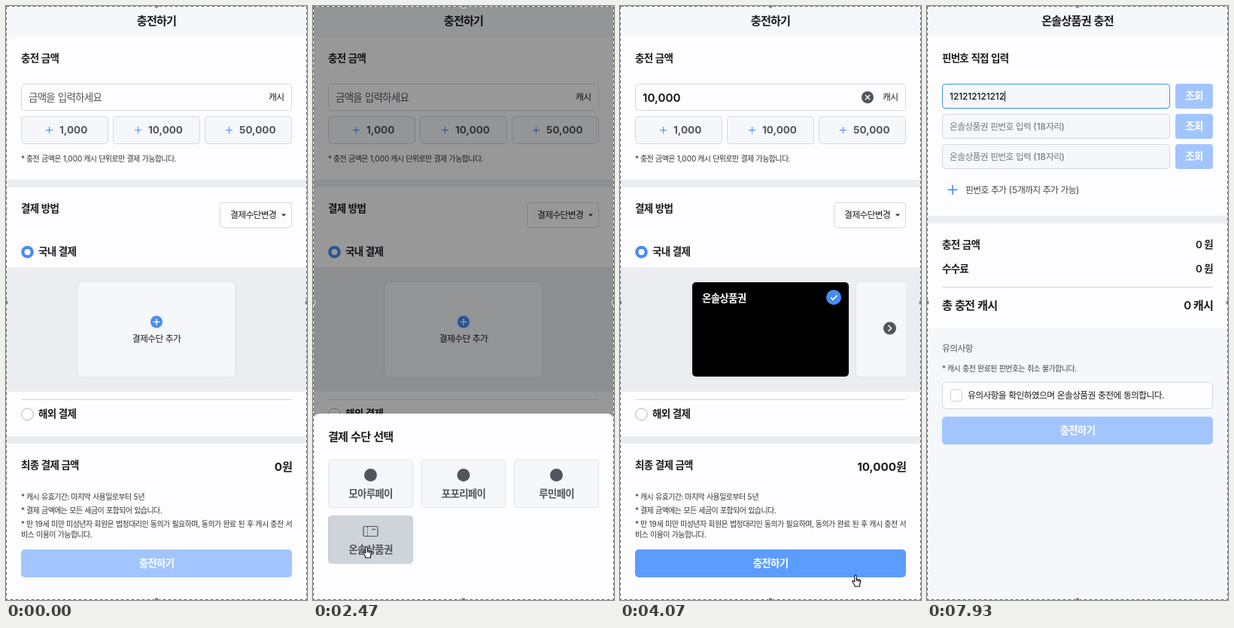
An HTML page with a canvas for the animation above (8 s loop, 400 by 787 pixels).

```html
<!DOCTYPE html>
<html lang="ko">
<head>
<meta charset="utf-8">
<title>충전하기</title>
<style>
html, body { margin: 0; width: 100%; height: 100%; overflow: hidden; background: #fdfcff; }
canvas { display: block; width: 400px; height: 787px; }
</style>
</head>
<body>
<canvas id="stage"></canvas>
<script>
const W = 400, H = 787, LOOP = 8000;
const cv = document.getElementById('stage');
const c = cv.getContext('2d');
const dpr = window.devicePixelRatio || 1;
cv.width = W * dpr;
cv.height = H * dpr;

const FONT = 'Inter, "Noto Sans CJK KR", "Noto Sans CJK JP", sans-serif';
const XS = 9.97, SM = 11.8, MD = 13.5, LG = 15.2;
const WHITE = '#fdfcff', PALE = '#f5f7fb', BAND = '#ecedf0', LINE = '#d6d8dc';
const INK = '#1d1d21', GREY = '#55565c', BLUE = '#458cf7', SOFT = '#a2c5ff', DARK = '#50555e';
const VOUCHER = '온솔상품권';

// moments of the story, in ms
const CHOSEN = 2537, PAID = 3200, NEXT_PAGE = 4270, TYPING = 6270;

// ---------- helpers ----------
const clamp = v => Math.max(0, Math.min(1, v));
const ramp = (t, a, b) => clamp((t - a) / (b - a));
const smooth = p => p * p * (3 - 2 * p);
const easeOut = p => 1 - Math.pow(1 - p, 3);

function fill(x, y, w, h, color) {
  c.fillStyle = color;
  c.fillRect(x, y, w, h);
}

function box(x, y, w, h, r, color, border) {
  c.beginPath();
  if (border) c.roundRect(x + .5, y + .5, w - 1, h - 1, r);
  else c.roundRect(x, y, w, h, r);
  c.fillStyle = color;
  c.fill();
  if (border) {
    c.strokeStyle = border;
    c.lineWidth = 1;
    c.stroke();
  }
}

function disc(x, y, r, color) {
  c.beginPath();
  c.arc(x, y, r, 0, 7);
  c.fillStyle = color;
  c.fill();
}

// points: flat list x, y, x, y ...
function line(points, color, width = 1) {
  c.beginPath();
  for (let i = 0; i < points.length; i += 2) c.lineTo(points[i], points[i + 1]);
  c.strokeStyle = color;
  c.lineWidth = width;
  c.stroke();
}

function plus(x, y, r, color, width) {
  line([x - r, y, x + r, y], color, width);
  line([x, y - r, x, y + r], color, width);
}

// Hangul is set slightly tighter than Latin; y is the vertical centre.
function text(str, x, y, size, weight = 500, color = INK, align = 0) {
  c.font = `${weight} ${size}px ${FONT}`;
  c.fillStyle = color;
  const runs = str.match(/[가-힣]+|[^가-힣]+/g).map(s => {
    const gap = /[가-힣]/.test(s) ? -.056 * size : 0;
    c.letterSpacing = gap + 'px';
    c.wordSpacing = -.08 * size + 'px';
    return { s, gap, w: c.measureText(s).width };
  });
  const total = runs.reduce((sum, r) => sum + r.w, 0);
  x -= total * align;
  for (const r of runs) {
    c.letterSpacing = r.gap + 'px';
    c.fillText(r.s, x, y + size * .365);
    x += r.w;
  }
  return total;
}
const mid = (s, x, y, size, weight, color) => text(s, x, y, size, weight, color, .5);
const right = (s, x, y, size, weight, color) => text(s, x, y, size, weight, color, 1);

function header(title) {
  fill(0, 0, W, H, WHITE);
  fill(0, 0, W, 41, PALE);
  mid(title, 200, 19.5, LG, 600);
}

function mainButton(y, color) {
  box(20, y, 360, 37, 5, color);
  mid('충전하기', 200, y + 18.5, MD, 600, '#fff');
}

// ---------- first page ----------
function addCard(x) {
  box(x, 366, 208, 125, 5, PALE);
  disc(x + 104, 418.5, 8, BLUE);
  plus(x + 104, 418.5, 4.5, '#fff', 1.4);
  mid('결제수단 추가', x + 104, 441, SM, 500);
}

function voucherCard(x) {
  box(x, 366, 208, 125, 5, '#000');
  text(VOUCHER, x + 13, 387.5, MD, 600, '#fff');
  disc(x + 188, 386, 10, BLUE);
  line([x + 184, 386, x + 187, 389, x + 192.5, 383.5], '#fff', 1.7);
}

function carousel(t) {
  const added = t >= CHOSEN;
  const x = added ? 218 * easeOut(ramp(t, CHOSEN, CHOSEN + 340)) - 122 : 96;
  c.save();
  c.beginPath();
  c.rect(20, 346, 360, 165);
  c.clip();
  c.shadowColor = 'rgba(0,0,0,.05)';
  c.shadowBlur = 5 * dpr;
  if (added) {
    voucherCard(x);
    addCard(x + 218);
  } else addCard(x);
  c.restore();
  if (added) {
    disc(358.5, 427, 8.5, DARK);
    line([356.5, 423, 360.5, 427, 356.5, 431], '#fff', 1.5);
  }
}

function chargePage(t) {
  const paid = t >= PAID;
  header('충전하기');
  text('충전 금액', 20, 69.5, MD, 600);
  box(20, 103, 360, 36, 4, WHITE, LINE);
  if (paid) {
    text('10,000', 30, 121.5, LG, 600, '#111');
    disc(329, 121, 8, DARK);
    line([326, 118, 332, 124], '#fff', 1.4);
    line([332, 118, 326, 124], '#fff', 1.4);
  } else text('금액을 입력하세요', 30, 121.5, MD, 400, GREY);
  right('캐시', 369.5, 121, SM, 500);
  [['1,000', 20, 51], ['10,000', 142, 47], ['50,000', 264, 46]].forEach(([s, x, dx]) => {
    box(x, 146, 116, 37, 4, PALE, LINE);
    plus(x + dx - 13.5, 164.5, 4.5, BLUE, 1);
    text(s, x + dx, 164.5, MD, 700, GREY);
  });
  text('* 충전 금액은 1,000 캐시 단위로만 결제 가능합니다.', 20, 202, XS, 400, '#333');

  fill(0, 230, W, 10, BAND);
  text('결제 방법', 20, 268.5, MD, 600);
  box(284, 260, 96, 34, 4, WHITE, LINE);
  text('결제수단변경', 298, 277, SM, 500);
  c.beginPath();
  c.moveTo(366, 275.5);
  c.lineTo(372, 275.5);
  c.lineTo(369, 278.8);
  c.fillStyle = '#333';
  c.fill();

  disc(28.5, 326, 8.3, BLUE);
  disc(28.5, 326, 4, '#fff');
  text('국내 결제', 43, 325.5, MD, 600);
  fill(0, 346, W, 165, BAND);
  carousel(t);

  line([20, 521.5, 380, 521.5], LINE);
  c.beginPath();
  c.arc(28.5, 541, 7.8, 0, 7);
  c.strokeStyle = '#b4b6ba';
  c.stroke();
  text('해외 결제', 43, 540.5, MD, 600);

  fill(0, 570, W, 10, BAND);
  text('최종 결제 금액', 20, 608.5, MD, 600);
  right(paid ? '10,000원' : '0원', 380, 610, LG, 700);
  [['* 캐시 유효기간: 마지막 사용일로부터 5년', 650.5],
   ['* 결제 금액에는 모든 세금이 포함되어 있습니다.', 668],
   ['* 만 19세 미만 미성년자 회원은 법정대리인 동의가 필요하며, 동의가 완료 된 후 캐시 충전 서', 686],
   ['비스 이용이 가능합니다.', 700]
  ].forEach(([s, y]) => text(s, 20, y, XS, 400, '#333'));
  mainButton(720, paid ? '#5c9cff' : SOFT);
}

// ---------- payment sheet ----------
function tile(x, y, label, hover) {
  box(x, y, 113, 64, 4, hover ? '#ced4da' : PALE, hover ? '#c8cfd6' : '#dfe3e8');
  mid(label, x + 56.5, y + 45, MD, 600, GREY);
}

function sheet(t) {
  if (t < 940 || t >= CHOSEN) return;
  fill(0, 0, W, H, `rgba(0,0,0,${.4 * ramp(t, 940, 1060)})`);
  const top = H - 19.5 * ramp(t, 1000, 1065) - 227.5 * easeOut(ramp(t, 1290, 1650));
  c.save();
  c.translate(0, top - 540);
  box(0, 540, W, 270, [9, 9, 0, 0], WHITE);
  text('결제 수단 선택', 20, 570.5, LG, 600);
  [['모아루페이', 20], ['포포리페이', 143.5], ['루민페이', 267]].forEach(([s, x]) => {
    tile(x, 601, s);
    disc(x + 56.5, 621.5, 8.5, DARK);
  });
  tile(20, 675, VOUCHER, t >= 1960);
  c.beginPath();
  c.roundRect(67, 689.5, 19, 13, 1.5);
  c.strokeStyle = DARK;
  c.lineWidth = 1.2;
  c.stroke();
  c.setLineDash([2, 1.5]);
  line([72.5, 690, 72.5, 702], DARK, 1);
  c.setLineDash([]);
  line([78, 693.5, 83, 693.5], DARK, 1.2);
  c.restore();
}

// ---------- second page ----------
function pinPage(t) {
  const focus = ramp(t, 5910, 6110);
  const count = t < TYPING ? 0 : Math.min(12, 1 + Math.floor((t - TYPING) / 145));
  header(VOUCHER + ' 충전');
  text('핀번호 직접 입력', 20, 69.5, MD, 600);
  for (let i = 0; i < 3; i++) {
    const y = 103 + 40 * i, cy = y + 16.5;
    box(20, y, 303, 33, 4, PALE, LINE);
    let end = 30;
    if (i === 0 && focus) {
      c.globalAlpha = focus;
      box(20, y, 303, 33, 4, PALE, '#3f93e0');
      c.globalAlpha = 1;
    }
    if (i === 0 && count) end += text('12'.repeat(6).slice(0, count), 30, cy, SM, 500, '#111');
    else text(VOUCHER + ' 핀번호 입력 (18자리)', 30, cy, SM, 500, '#76787e');
    if (i === 0 && focus) fill(Math.round(end), cy - 7, 1, 14, '#111');
    box(330, y, 50, 33, 4, SOFT);
    mid('조회', 355, cy, MD, 600, '#fff');
  }
  plus(34, 243.5, 6.5, BLUE, 1.6);
  text('핀번호 추가 (5개까지 추가 가능)', 51, 243.5, SM, 400, '#444');

  fill(0, 278, W, 10, BAND);
  text('충전 금액', 20, 316, MD, 600);
  right('0 원', 380, 316, MD, 600);
  text('수수료', 20, 348.5, MD, 600);
  right('0 원', 380, 348.5, MD, 600);
  line([20, 372.5, 380, 372.5], LINE);
  text('총 충전 캐시', 20, 396.5, LG, 600);
  right('0 캐시', 380, 396.5, LG, 600);

  fill(0, 427, W, H - 427, PALE);
  text('유의사항', 20, 454, SM, 400, GREY);
  text('* 캐시 충전 완료된 핀번호는 취소 불가합니다.', 20, 480, XS, 400, '#444');
  box(20, 498, 360, 36, 4, WHITE, LINE);
  box(31, 508, 16, 16, 3, WHITE, '#d0d2d8');
  text(`유의사항을 확인하였으며 ${VOUCHER} 충전에 동의합니다.`, 54, 516, SM, 400);
  mainButton(544, SOFT);
}

// ---------- pointer ----------
const ARROW = new Path2D('M0 0V12L2.8 9.4 4.7 13.8 6.8 12.9 4.9 8.7H8.6Z');
const HAND = new Path2D('M-1.3 1Q0 -1 1.3 1V5.2L5 6Q7 6.4 6.8 8.5L5.6 12V15H-1.2V13.2L-4.2 9Q-4.8 7 -2.8 7.6L-1.3 9Z');
const BEAM = new Path2D('M-2.5 -7Q0 -7 0 -5.5Q0 -7 2.5 -7M0 -5.5V5.5M-2.5 7Q0 7 0 5.5Q0 7 2.5 7M-1.5 2.5H1.5');

// time, x, y, shape from that time on
const PATH = [
  [470, -12, 520, ARROW], [760, 128, 444, HAND], [920, 136, 441, HAND], [1000, 136, 441, ARROW],
  [1450, 136, 441, ARROW], [1960, 74, 706, HAND], [2100, 71, 716, HAND], [CHOSEN, 71, 716, ARROW],
  [2670, 180, 228, ARROW], [2860, 205, 167, HAND], [3270, 205, 167, ARROW], [3870, 306, 740, HAND],
  [4060, 313, 754, HAND], [NEXT_PAGE, 313, 754, ARROW], [4750, 332, 738, ARROW], [5380, 180, 205, BEAM],
  [5470, 174, 193, BEAM], [5730, 168, 121, BEAM], [TYPING, 168, 121, null]
];

function pointer(t) {
  const i = PATH.findIndex((p, n) => n + 1 < PATH.length && t >= p[0] && t < PATH[n + 1][0]);
  if (i < 0) return;
  const [ta, xa, ya, shape] = PATH[i], [tb, xb, yb] = PATH[i + 1];
  const p = smooth(ramp(t, ta, tb));
  c.save();
  c.translate(xa + (xb - xa) * p, ya + (yb - ya) * p);
  c.lineJoin = 'round';
  if (shape === HAND) {
    c.fillStyle = '#fff';
    c.fill(HAND);
    c.strokeStyle = '#111';
    c.lineWidth = 1.1;
    c.stroke(HAND);
    c.stroke(new Path2D('M1.3 5V8M3.2 6V8.5M5 6.5V9'));
  } else {
    c.strokeStyle = '#fff';
    c.lineWidth = 2;
    c.stroke(shape);
    c.strokeStyle = c.fillStyle = '#111';
    c.lineWidth = 1;
    if (shape === ARROW) c.fill(shape);
    else c.stroke(shape);
  }
  c.restore();
}

// ---------- selection frame ----------
function frame() {
  c.strokeStyle = '#fff';
  c.lineWidth = 1;
  c.strokeRect(.5, .5, W - 1, H - 1);
  c.strokeStyle = '#66676b';
  c.setLineDash([4, 3]);
  c.strokeRect(.5, .5, W - 1, H - 1);
  c.setLineDash([]);
  [[200, 0], [200, H], [0, 393], [W, 393]].forEach(([x, y]) => {
    disc(x, y, 3.4, '#e4e4e6');
    disc(x, y, 2.4, '#77787c');
  });
}

function draw(now) {
  const t = now % LOOP;
  c.setTransform(dpr, 0, 0, dpr, 0, 0);
  if (t < NEXT_PAGE) {
    chargePage(t);
    sheet(t);
  } else pinPage(t);
  frame();
  pointer(t);
  requestAnimationFrame(draw);
}
requestAnimationFrame(draw);
</script>
</body>
</html>
```
